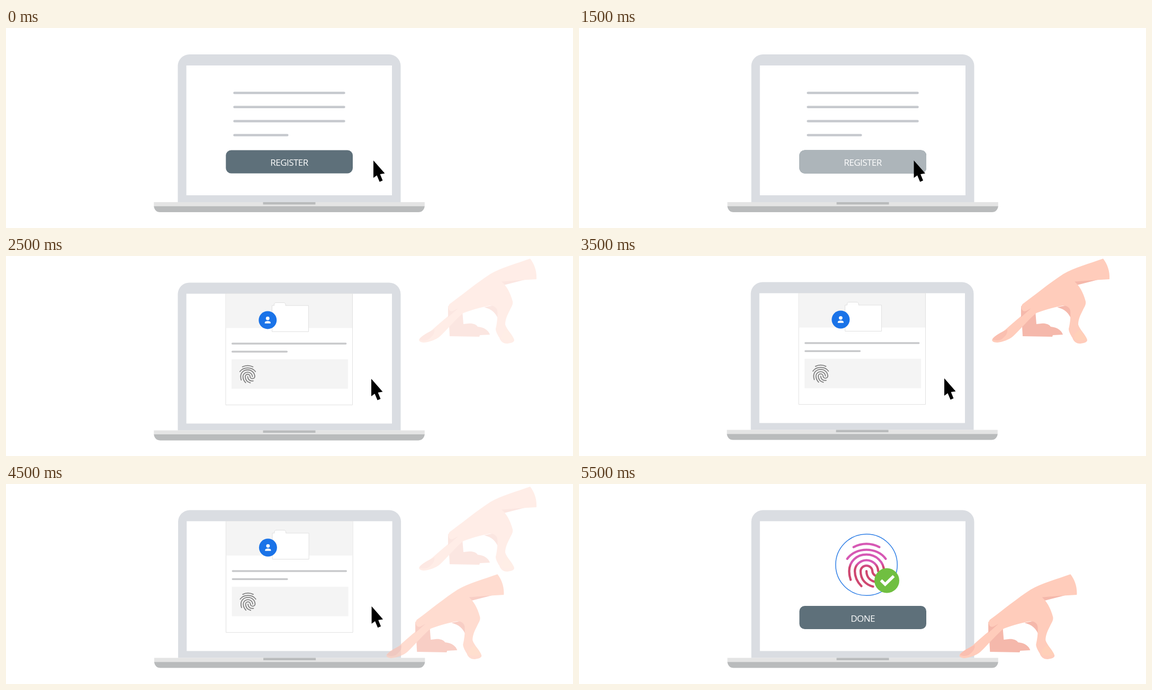
An HTML page for the animation above (6 s loop, 1071 by 379 pixels).

```html
<!DOCTYPE html>
<html lang="en">
<head>
<meta charset="utf-8">
<title>Register with a fingerprint</title>
<style>
  html, body { margin: 0; width: 100%; height: 100%; overflow: hidden; background: #fff; }
  svg { display: block; width: 100vw; height: 100vh; }
  text { font: 17px "Open Sans", "Noto Sans", sans-serif; letter-spacing: -.55px; fill: #fff; text-anchor: middle; }
  .rule { stroke: #c6c9ce; stroke-width: 4.5; stroke-linecap: round; }
  .thin { stroke: #c8c9cb; stroke-width: 3.5; stroke-linecap: round; }
  .btn { fill: #5e707a; }
  .edge { fill: #fff; stroke: #e0e0e0; }
</style>
</head>
<body>
<svg viewBox="0 0 1071 379" preserveAspectRatio="xMidYMid meet">
  <defs>
    <linearGradient id="ink" gradientUnits="userSpaceOnUse" x1="0" y1="11.2" x2="0" y2="12.8">
      <stop offset="0" stop-color="#d658b4"/>
      <stop offset="1" stop-color="#cf4770"/>
    </linearGradient>
    <path id="pointer" d="M0 0V33L6.5 28.2 11.7 40.5 17.5 38 12.6 26 21.5 24.6Z"/>
    <path id="print" fill="none" stroke-linecap="round" d="M6.3 4Q12 1.1 17.7 4M3.5 9.2C7.3 3.8 16.7 3.8 20.5 9.2
      M5 18.5C4.5 17 4.35 15.9 4.35 14.7 4.35 10.3 7.7 7.3 12 7.3S19.75 10.6 19.75 14.66A2.58 2.44 0 0 1 14.6 14.66C14.6 13.3 13.4 12.2 12 12.2S9.4 13.3 9.4 14.66C9.4 18.5 11.8 20.7 14.9 21.5
      M9.75 21.3C7.8 19.3 6.85 17.3 6.85 14.66 6.85 12 9.2 9.77 12 9.77S17.16 12 17.16 14.66
      M12 14.66C12 17.5 14 19.45 16.92 19.45Q17.4 19.45 18 19.35"/>
    <g id="hand">
      <g fill="#f5b8ab">
        <path d="M835 95L838 152 894 153 895 150 914 149C912 142 904 135 891 134 888 129 880 127 873 128L864 129 862 104Z"/>
        <path d="M903 97L928 92 930 120C925 108 918 101 903 97Z"/>
        <path d="M934 46L980 45 941 55Z"/>
      </g>
      <path fill="#ffccbb" d="M990 5C998 15 1003 29 1002 44 980 45 956 47 936 48.5 945 56 952 68 957 86 958 92 955 96 952 102 947 112 943 120 943 130 946 140 957 149 960 159 960 163 955 165 947 166 938 166 934 161 932 155 927 147 925 142 925 138 928 125 929 113 928 104 927 97 921 94 914 94 890 99 877 103 864 108 850 119 835 138 820 152 812 159 800 163 790 164 783 164 779 161 780.500 158 783 152 795 148 805 140 815 131 825 122 835 114 835 105 834 95 838 91 860 75 890 50 915 34 935 22 965 14 990 5Z"/>
      <path fill="#f5b8ab" d="M835 95C836 104 840 106 845 104L854 99 835 116Z"/>
      <path fill="#fabfb0" d="M781 158C786 150 797 145 809 139 810 146 806 152 798 158 792 161 784 160 781 158Z"/>
      <path fill="#ffd0b8" d="M936 157C934 148 941 142 947 140 950 147 956 151 959 157 952 161 941 160 936 157Z"/>
    </g>
  </defs>

  <g id="device">
    <path fill="#dadde2" d="M324.500 330V72a22 22 0 0 1 22-22H723.500a22 22 0 0 1 22 22V330Z"/>
    <path fill="#fff" d="M340.700 71H729V317H340.700Z"/>
    <path fill="#e4e4e4" d="M279.300 330H790.800V338H279.300Z"/>
    <path fill="#b9bbbc" d="M279.300 337.700H790.800C790 344 786 349 779 349H291C284 349 280 344 279.300 337.700Z"/>
    <path fill="#b9bbbc" d="M485.500 330H584.500V334.500H485.500Z"/>

    <g id="form">
      <path class="rule" d="M431.500 123H638.500M431.500 149.700H638.500M431.500 176.400H638.500M431.500 203H531.300"/>
      <rect class="btn" x="415.300" y="231.500" width="239.700" height="44" rx="10"/>
      <rect id="pale" fill="#adb5ba" x="415.300" y="231.500" width="239.700" height="44" rx="10"/>
      <text x="535" y="261">REGISTER</text>
      <use id="away" href="#pointer" x="694" y="251"/>
      <use id="over" href="#pointer" x="631.500" y="251"/>
    </g>

    <g id="verify">
      <path class="edge" d="M415 71H654.500V281.800H415Z"/>
      <path fill="#f4f4f4" d="M415.500 71H654V136H415.500Z"/>
      <path class="edge" d="M502.500 93.500H506.500V90.500L508.500 88H526L528 90.500V93.500H571.500V143H502.500Z"/>
      <circle cx="494.300" cy="121" r="17" fill="#1a73e8"/>
      <circle cx="494.300" cy="117.800" r="3.400" fill="#fff"/>
      <path fill="#fff" d="M488.800 127.300V125.500C489 121.800 499.600 121.800 499.800 125.500V127.300Z"/>
      <path class="thin" d="M427.700 165.500H641.700M427.700 180.800H530.300"/>
      <path fill="#f4f4f4" d="M426 195.300H646V251H426Z"/>
      <use href="#print" stroke="#808080" stroke-width="1.050" transform="translate(456.500 223.500) scale(1.730) translate(-12 -12)"/>
      <use href="#pointer" x="690" y="232.300"/>
    </g>

    <g id="done">
      <circle cx="542" cy="153.600" r="58.200" fill="#fff" stroke="#2f7fe6" stroke-width="1.500"/>
      <use href="#print" stroke="url(#ink)" transform="translate(542 154.300) scale(4.270) translate(-12 -12)"/>
      <circle cx="580.500" cy="183.500" r="23.500" fill="#70bf41"/>
      <path fill="none" stroke="#fff" stroke-width="5.500" d="M569.500 183L577.300 190.700 593.500 175"/>
      <rect class="btn" x="415.300" y="231.500" width="239.700" height="44" rx="10"/>
      <text x="535" y="261">DONE</text>
    </g>
  </g>
  <use id="high" href="#hand"/>
  <use id="low" href="#hand" x="-61.700" y="166"/>
</svg>
<script>
const STEP = 500;
const $ = id => document.getElementById(id);
const show = (id, value) => $(id).setAttribute('opacity', value);

// page, progress of the fade on that page, upper hand, lower hand, device shift x, y
const steps = [
  ['form', 0, 0, 0, 0, 0],
  ['form', 1 / 3, 0, 0, .35, 0],
  ['form', 2 / 3, 0, 0, .7, 0],
  ['form', 1, 0, 0, 1, 0],
  ['verify', 0, 0, 0, 0, .7],
  ['verify', 0, .35, 0, 0, .4],
  ['verify', 0, .68, 0, 0, 0],
  ['verify', 0, 1, 0, 0, -.5],
  ['verify', 0, .68, .35, .3, -.5],
  ['verify', 0, .35, .68, .6, -.5],
  ['verify', 0, 0, 1, 1, -.5],
  ['done', 0, 0, 1, 1, -.5]
];
const pages = ['form', 'verify', 'done'];
const start = performance.now();
let current = -1;

function render(index) {
  const [page, fade, high, low, dx, dy] = steps[index];
  for (const id of pages) $(id).setAttribute('display', id === page ? 'inline' : 'none');
  show('pale', fade);
  show('over', fade);
  show('away', 1 - fade);
  show('high', high);
  show('low', low);
  $('device').setAttribute('transform', `translate(${dx} ${dy})`);
}

function tick() {
  const elapsed = Math.max(0, performance.now() - start);
  const index = Math.floor(elapsed / STEP) % steps.length;
  if (index !== current) render(current = index);
  requestAnimationFrame(tick);
}
tick();
</script>
</body>
</html>
```
